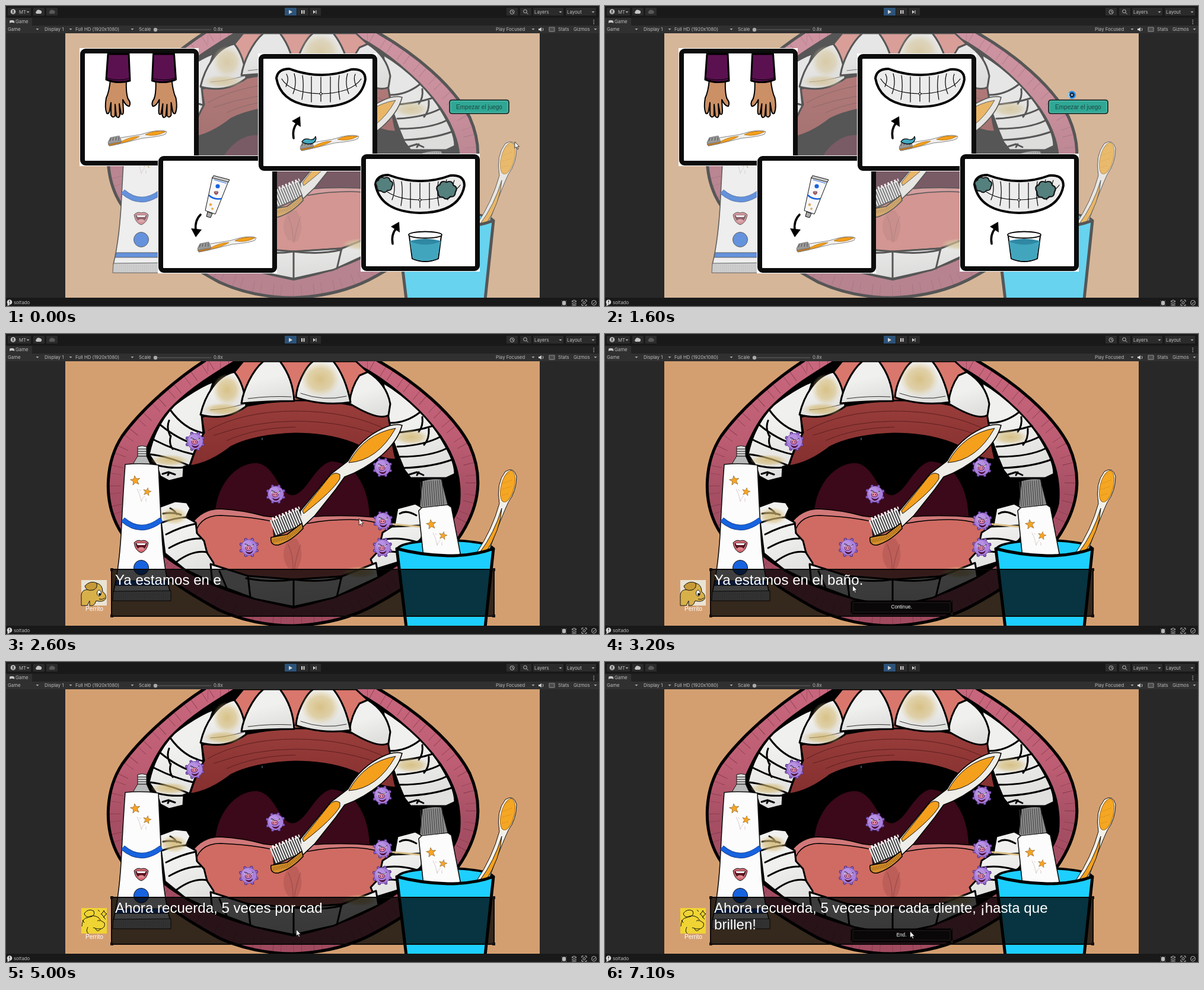
Write an HTML page that moves like this. It is 1000 px wide and 506 px high and loops after 7200 ms.

```html
<!DOCTYPE html>
<html lang="es">
<head>
<meta charset="utf-8">
<style>
html, body { margin: 0; width: 100%; height: 100%; overflow: hidden; background: #191919; }
svg { display: block; width: 100vw; height: 100vh; }
text { font-family: "Liberation Sans", Arial, sans-serif; white-space: pre; }
.ui text { font: 7.8px Inter, sans-serif; fill: #bdbdbd; }
.ink { stroke: #000; stroke-width: 3; stroke-linejoin: round; stroke-linecap: round; }
.thin { stroke: #111; stroke-width: 1; stroke-linejoin: round; }
.line { fill: none; }
.tooth { fill: url(#enamel); }
</style>
</head>
<body>
<svg viewBox="0 0 1000 506" preserveAspectRatio="none">
<defs>
  <linearGradient id="enamel" x2="0.3" y2="1"><stop offset="0.5" stop-color="#f0f0ef"/><stop offset="1" stop-color="#e0e0df"/></linearGradient>
  <radialGradient id="stain"><stop stop-color="#cfb162" stop-opacity=".75"/><stop offset=".6" stop-color="#d6bd7c" stop-opacity=".6"/><stop offset="1" stop-color="#dcc890" stop-opacity="0"/></radialGradient>
  <linearGradient id="lipShade" x2="0" y2="1"><stop stop-color="#c8677d"/><stop offset=".3" stop-color="#bd5d73"/><stop offset=".5" stop-color="#a64f64"/><stop offset="1" stop-color="#a04a5f"/></linearGradient>
  <linearGradient id="palate" x2="0" y2="1"><stop stop-color="#9a3e3b"/><stop offset="1" stop-color="#842f2f"/></linearGradient>
  <clipPath id="stage"><path d="M100 46H900V492H100Z"/></clipPath>
  <path id="lip" d="M340 42C295 70 232 122 196 172C168 215 165 275 186 320C212 375 290 428 360 466C400 484 440 492 485 492C540 490 585 478 625 455C680 425 745 382 775 325C800 280 803 235 782 188C755 135 690 80 622 42Z"/>
  <clipPath id="lipClip"><use href="#lip"/></clipPath>
  <path id="star" d="M0 -9L2.4 -3 9 -2.8 3.8 1.3 5.6 8 0 4.2 -5.6 8 -3.8 1.3 -9 -2.8 -2.4 -3Z" fill="#f7a423" stroke="#8d6a35" stroke-width=".8"/>
  <g id="sparks"><use href="#star" transform="translate(218 247) rotate(-8) scale(.9)"/><use href="#star" transform="translate(238 266) rotate(12) scale(.75)"/>
    <path d="M221 261Q226 270 228 282M234 273Q229 277 228 283M225 262l2 3M236 277v6" fill="none" stroke="#d6bcbc" stroke-width=".8"/></g>
  <g id="lips" class="thin"><path d="M216 352Q222 346 228 349Q234 346 240 352Q238 366 228 369Q218 366 216 352Z" fill="#d46a74"/><path d="M219 353H237Q235 363 228 364Q221 363 219 353Z" fill="#5c1320"/><path d="M220 353H236L234 356H222Z" fill="#fff" stroke="none"/><ellipse cx="228" cy="362" rx="5" ry="2.5" fill="#e08a90" stroke="none"/></g>
  <g id="germ">
    <g fill="#9a6bd0" stroke="#4c2a78" stroke-width="1" id="knobs"></g>
    <circle r="13.5" fill="#aa80dc" stroke="#6a48a0" stroke-width=".8"/>
    <circle cx="-3" cy="-4" r="8" fill="#c09ce8" opacity=".6"/>
    <ellipse cx="-1" cy="1" rx="5" ry="3.8" fill="#e58aa8" stroke="#5a1f4c"/>
    <path d="M-3 0v2M1 0v2M-7 -6l5 2M8 -5l-5 2" stroke="#381745" stroke-width="1.3"/>
    <circle cx="-5" cy="-3" r="1.7" fill="#fff"/><circle cx="5" cy="-3" r="1.7" fill="#fff"/><circle cx="-5" cy="-3" r=".8"/><circle cx="5" cy="-3" r=".8"/>
    <path d="M-6 6Q0 11 7 5Q4 12 -1 11Q-5 10 -6 6Z" fill="#4a1038"/>
  </g>
  <g id="card"><path d="M-1 -1H200V198H-1Z" fill="#fff"/><rect x="4" y="4" width="192" height="189" rx="5" fill="#fff" stroke="#0c0c0c" stroke-width="8"/></g>
  <g id="miniBrush" stroke="#777" stroke-width=".9">
    <path d="M271 212Q264 208 244 212L226 217 194 222 172 232 174 236 194 232 230 223Q262 220 269 216Z" fill="#f1f0ee"/>
    <path d="M269 212Q250 209 235 217Q252 221 269 212ZM194 229Q210 220 225 220Q214 227 194 231Z" fill="#f5a01c" stroke="#b87414"/>
    <path d="M172 230L176 222 191 219 195 229 174 234Z" fill="#9a9a9a"/>
    <path d="M175 228l2 -5M180 227l1 -5M185 227l1 -6M190 227v-6" stroke="#444"/>
    <path d="M172 233L194 229 193 232 175 236Z" fill="#c67a1d"/>
  </g>
  <g id="smile" class="ink">
    <path d="M456 122Q458 106 478 106Q531 126 582 107Q606 105 606 124Q598 169 531 170Q464 168 456 122Z" fill="#ececec" stroke-width="4"/>
    <path d="M465 123Q480 147 531 148Q582 147 599 123M531 120V161M515 119V162M547 119V162M500 117Q503 138 499 158M562 117Q559 138 563 158M486 114Q491 130 484 148M576 114Q571 130 578 148M473 115Q478 123 472 136M589 115Q585 123 591 136" class="line" style="stroke-width:1.2"/>
    <circle cx="531" cy="148" r="2" style="stroke-width:1" fill="#fff"/>
  </g>
  <g id="arrow"><path d="M485 223Q482 207 492 196" class="ink line" style="stroke-width:3.6"/><path d="M496 186L497 204 482 194Z"/></g>
  <g id="hand" class="ink">
    <path d="M176 124Q174 145 169 155Q166 172 170 181Q174 183 175 175L177 163 177 184Q180 190 184 185L184 166 186 186Q190 191 192 184L191 165 194 182Q198 185 198 177L197 158Q203 170 208 169Q211 163 206 157Q202 148 203 124Z" fill="#cb9065" style="stroke-width:2"/>
    <path d="M172 81H207L209 126Q188 132 169 124Z" fill="#5b1150"/><path d="M169 121Q188 128 209 122" class="line" style="stroke-width:1"/>
  </g>
  <path id="blob" d="M-14 2Q-19 -6 -11 -9Q-8 -17 0 -13Q9 -17 11 -8Q19 -5 14 3Q14 11 6 10Q0 17 -6 11Q-14 12 -14 2Z" fill="#54807e" stroke="#111" stroke-width="2"/>
</defs>

<path d="M0 0H1000V506H0Z" fill="#191919"/>
<path d="M0 20H1000V492H0Z" fill="#282828"/>
<path d="M0 20H1000V33H0Z" fill="#222"/><path d="M0 20H44V33H0Z" fill="#303030"/><path d="M0 33H1000V46H0Z" fill="#303030"/>

<g clip-path="url(#stage)">
<path d="M100 46H900V492H100Z" fill="#d49f70"/>

<use href="#lip" fill="url(#lipShade)"/>
<g clip-path="url(#lipClip)"><use href="#lip" fill="none" stroke="#6f2a3d" stroke-opacity=".7" stroke-width="42" stroke-dasharray=".8 13 .6 21"/></g>
<use href="#lip" fill="none" stroke="#000" stroke-width="5"/>
<path class="ink" style="stroke-width:4" d="M390 44C350 68 312 92 284 120C258 145 246 175 236 197C215 215 200 245 208 285C225 340 255 370 300 396C350 430 420 448 485 461C550 448 612 424 655 392C710 360 755 330 764 285C768 240 755 205 732 172C705 135 660 92 612 63L578 44Z"/>
<path class="ink" fill="url(#palate)" d="M330 140Q400 118 486 110Q570 110 648 138Q650 185 658 212Q630 212 608 195Q560 168 488 168Q420 170 380 190Q345 218 310 223Q320 190 334 166Z"/>
<path d="M340 163Q400 130 488 130Q580 130 645 163M350 171Q420 147 488 147Q570 147 638 174M372 180Q420 158 488 157" class="line" stroke="#5c2020"/>
<path d="M353 305C353 255 390 215 425 218C455 224 460 270 483 272C507 270 520 222 548 215C590 215 615 265 613 318L480 325Z" fill="#3b0919"/>
<path class="ink" style="stroke-width:1.5" d="M312 322Q330 295 360 295Q400 297 435 307L478 312Q550 303 620 309L648 325 650 360 600 400 360 400 330 350Z" fill="#d17879"/>
<path class="ink" style="stroke-width:1.5" d="M318 345Q322 306 362 306Q435 309 482 325Q530 313 580 313Q640 314 652 336Q645 380 612 395L565 408 485 414 405 408 340 392Z" fill="#cf6b63"/>
<path d="M478 345Q459 372 476 395L491 397Q506 372 490 345Z" fill="#9c4745" opacity=".35"/><path d="M476 355Q485 375 484 399M497 355Q489 375 486 399" class="line" stroke="#8d4343" stroke-width=".8"/>

<path d="M382 68L400 46H590L614 68 580 112 486 112 402 118Z" fill="#d9776d" class="ink"/>
<g class="ink">
  <path class="tooth" d="M350 80C318 92 284 120 284 120C262 142 248 170 241 203L254 222 260 240 275 248 299 242 300 224 310 221 318 198 333 168 330 138Z"/>
  <path class="line" d="M277 128Q300 160 332 167M260 153Q290 178 322 187M275 146Q270 158 277 172M247 177Q280 195 316 203M244 203Q275 207 309 222M278 172Q274 184 281 194M257 222Q280 227 300 225M264 236L274 233 285 237M275 234L273 238"/>
  <path class="tooth" d="M636 82C680 108 718 148 735 178C748 200 757 218 757 236L742 243H682L672 230 662 206 651 175 645 140Z"/>
  <path class="line" d="M648 150Q675 150 698 132M651 167Q688 165 720 155M660 190Q705 188 733 173M664 207Q715 207 743 193M671 226Q720 224 752 212M702 140Q704 155 696 165M713 160Q714 177 705 187M680 237L693 233 704 238M696 233L693 238"/>
  <path class="tooth" d="M328 136C335 105 355 70 385 64Q402 85 405 122Q370 148 328 136Z"/>
  <path class="tooth" d="M579 117Q582 90 596 70L610 64Q642 84 648 118L645 137Q628 147 579 117Z"/>
  <path class="tooth" d="M397 117C400 95 415 62 434 46H462Q484 75 486 113Q440 113 397 117Z"/>
  <path class="tooth" d="M489 107C490 85 505 55 518 46H552C568 66 576 90 581 115Q535 122 489 107Z"/>
  <path class="line" style="stroke-width:.8" d="M345 128Q370 127 402 118M497 100Q535 114 574 105M408 109Q445 104 481 106"/>
  <path class="tooth" d="M258 292L285 282 305 284 311 294 304 309 320 318 322 336 334 349 339 369 350 386 350 420 300 396 268 370Z"/>
  <path class="line" d="M263 318Q285 310 304 309M270 338Q295 325 320 320M275 361Q305 344 328 345M288 384Q315 364 339 368M265 303Q282 300 295 305M277 294Q285 298 288 304"/>
  <path class="tooth" d="M660 294L690 286 715 300 700 345 664 384 622 397 615 380 628 366 635 335 655 322Z"/>
  <path class="line" d="M650 325L698 323M635 347Q660 342 690 350M627 370Q650 364 670 370M664 303Q675 296 692 306"/>
  <path class="tooth" d="M345 388L408 408 485 414 566 409 624 386 628 410 552 445 485 460 420 447 348 420Z"/>
  <path class="line" d="M408 408L412 444M485 414V460M566 409L558 443M360 400L372 428M405 412Q450 420 485 414Q530 420 566 411"/>
</g>
<g fill="url(#stain)">
  <ellipse cx="373" cy="94" rx="25" ry="27"/><ellipse cx="366" cy="127" rx="34" ry="11"/><ellipse cx="530" cy="76" rx="34" ry="30"/>
  <ellipse cx="276" cy="213" rx="32" ry="10"/><ellipse cx="683" cy="174" rx="30" ry="13"/><ellipse cx="283" cy="307" rx="24" ry="15"/><ellipse cx="597" cy="402" rx="30" ry="10"/>
</g>
<path d="M645 320L698 325" stroke="#d8bf87" stroke-width="3"/>
<path d="M432 175v4" stroke="#6d8fb0" stroke-width="1"/>

<!-- large brush -->
<path class="ink" style="stroke-width:1.6" d="M668 154Q655 150 636 159Q598 176 577 214L548 236 496 299 500 326 521 306 556 262 571 241Q604 229 634 204Q661 180 668 154Z" fill="#efede8"/>
<path class="thin" fill="#f5a01c" d="M657 159Q605 168 578 217Q626 214 657 159ZM563 237Q554 231 545 241L500 298 502 303Q552 264 563 244Z"/>
<path class="thin" d="M449 316L494 295 499 322 452 344Z" fill="#222"/>
<path d="M450 327L498 307" stroke="#e6e6e6" stroke-width="27" stroke-dasharray="2.6 1.5"/>
<path d="M449 312L495 293" stroke="#fff" stroke-width="5" stroke-dasharray="3 3"/>
<path class="ink" style="stroke-width:1.6" d="M447 343L474 338 499 319 501 328Q482 349 459 356Q445 357 447 343Z" fill="#d38e2b"/>
<path d="M450 349L476 343 499 325" class="line" stroke="#8a5512" stroke-width="6" stroke-dasharray=".8 2"/>

<!-- paste tube -->
<g class="thin">
  <path d="M222 190Q229 187 237 190V206H222Z" fill="#ddd"/><path class="line" d="M222 194H237M222 198H237M222 202H237"/>
  <path d="M222 206H237L244 221H213Z" fill="#b9b9b9"/>
  <path d="M201 220Q229 217 257 221Q260 290 263 342Q266 395 277 436H181Q192 390 195 320Q198 260 201 220Z" fill="#fcfcfc" style="stroke-width:1.6"/>
  <path d="M197 313Q228 340 262 313" class="line" style="stroke:#123a87;stroke-width:9"/><path d="M197 313Q228 340 262 313" class="line" style="stroke:#1763df;stroke-width:7.5"/>
  <circle cx="228" cy="394" r="12.5" fill="#1763df"/><path d="M186 416H271L273 424H184Z" fill="#1763df"/>
  <path d="M181 434L278 433V450H180Z" fill="#c9c9c9"/><path d="M182 442H277" stroke="#888" style="stroke-width:13" stroke-dasharray=".7 2.5" stroke-opacity=".45"/>
</g>
<use href="#sparks"/><use href="#lips"/>

<!-- cup -->
<ellipse cx="741" cy="362" rx="80" ry="14" fill="#1ccfff" class="ink" style="stroke-width:4"/>
<g class="thin">
  <path d="M702 292L745 288 751 292 767 375 704 376 696 298Z" fill="#fcfcfc" style="stroke-width:1.6"/>
  <path d="M702 248Q718 243 734 245L745 288 701 293 698 290Z" fill="#8b8b8b"/><path d="M700 270L739 267" style="stroke:#3f3f3f;stroke-width:42" stroke-dasharray="1 2.6"/>
  <path d="M793 370Q820 330 832 286Q826 252 842 232Q856 223 861 240Q861 265 847 284Q837 305 812 372Z" fill="#f1efe9"/>
  <ellipse cx="846" cy="257" rx="11" ry="27" transform="rotate(14 846 257)" fill="#f5a623" style="stroke:#a86b11"/>
  <path d="M842 238L850 235M838 252L854 246M836 262L853 257M837 272L848 269" style="stroke:#b97514" stroke-dasharray="1 2"/>
  <path d="M798 370Q824 335 836 294Q834 330 808 371Z" fill="#f5a01c"/>
</g>
<use href="#sparks" transform="translate(499 74)"/>
<path d="M659 362Q700 373 745 374Q790 374 822 362L808 495H675Z" fill="#1ccfff" class="ink" style="stroke-width:5"/>

<g id="game">
  <g id="germs"></g>
  <path d="M178 397H823V476H178Z" fill="#000" fill-opacity=".75" stroke="#0a0808" stroke-width="2"/>
  <path d="M176 395h5v5h-5zM820 395h5v5h-5zM176 473h5v5h-5zM820 473h5v5h-5z" fill="#15100e"/>
  <g id="calm"><path d="M127 415H170V458H127Z" fill="#e9e3d4"/>
    <path class="thin" fill="#d8b04a" d="M127 440Q128 431 138 431Q141 420 152 420Q163 422 163 435Q170 439 168 447Q163 453 152 450Q150 457 146 458H141V450L137 458H127Z"/>
    <path class="thin" fill="#c79a38" d="M133 425Q142 415 153 420Q155 430 146 432Q135 434 133 425Z"/>
    <ellipse class="thin" cx="157" cy="437" rx="3.4" ry="5" fill="#fff"/><circle cx="158" cy="439" r="2"/><path d="M157 447Q163 449 167 445" class="thin line"/></g>
  <g id="happy"><path d="M127 415H170V458H127Z" fill="#f0d433"/>
    <path class="thin line" d="M128 446Q128 432 138 431Q146 425 156 431Q159 437 166 440Q168 447 161 450Q153 451 147 448M132 424Q139 415 148 420Q151 428 142 430Q133 431 132 424ZM154 437Q156 434 159 437M151 450Q154 457 160 450M138 447Q134 455 139 458M163 423l2 -4 2 4 3 2 -3 2 -2 4 -2 -4 -3 -2ZM155 418l3 3M165 431l3 3M129 435l3 5"/></g>
  <text x="149" y="467" font-size="10.2" text-anchor="middle" fill="#fff">Perrito</text>
  <g font-size="24.1" fill="#fff"><text id="row0" x="184" y="423"/><text id="row1" x="184" y="451"/></g>
  <g id="next"><path d="M415.5 450.5H585V472H415.5Z" fill="#090707" stroke="#000" stroke-width="2"/><path d="M418 453H582V469H418Z" fill="none" stroke="#2b2422" stroke-width=".7"/>
    <path d="M413 448h4v4h-4zM583 448h4v4h-4zM413 470h4v4h-4zM583 470h4v4h-4z" fill="#1a1412"/>
    <text id="label" x="500" y="463" font-size="8.2" text-anchor="middle" fill="#fff"/></g>
</g>

<g id="intro">
  <path d="M100 46H900V492H100Z" fill="#d8d8d8" opacity=".4"/>
  <use href="#card" x="125" y="72"/><use href="#card" x="257" y="253"/><use href="#card" x="426" y="81"/><use href="#card" x="599" y="250"/>
  <use href="#hand"/><use href="#hand" transform="translate(455.5) scale(-1 1)"/><use href="#miniBrush"/>
  <use href="#smile"/><use href="#arrow"/><use href="#miniBrush" x="324" y="8"/>
  <path class="ink" style="stroke-width:1.3" fill="#43a9c1" d="M499 229Q503 222 512 225Q519 227 522 220Q525 228 516 232Q506 234 499 229Z"/>
  <g class="thin"><path d="M348 289L375 296 353 351 336 345Z" fill="#f8f8f8"/><path d="M350 286L377 293 375 297 348 290Z" fill="#ccc"/>
    <path d="M340 347L348 350 345 357 338 355Z" fill="#aaa"/><circle cx="357" cy="304" r="3.6" fill="#1763df" style="stroke:none"/><path d="M342 319Q350 327 363 325" class="line" style="stroke:#1763df;stroke-width:2.5"/><path d="M351 293L372 299" style="stroke:#1763df"/></g>
  <use href="#lips" transform="translate(286 208) scale(.3)"/><use href="#star" transform="translate(345 335) scale(.3)"/><use href="#star" transform="translate(348 342) scale(.25)"/>
  <path d="M328 352Q318 362 320 378" class="ink line" style="stroke-width:3.6"/><path d="M312 375L330 377 320 390Z"/>
  <use href="#miniBrush" x="151" y="179"/>
  <use href="#smile" x="167" y="179"/><use href="#arrow" x="167" y="178"/>
  <use href="#blob" transform="translate(638 302) scale(.9)"/><use href="#blob" transform="translate(743 311) scale(1.05)"/>
  <path d="M680 388L685 426Q707 436 729 426L734 388Z" fill="#fff" class="ink" style="stroke-width:2"/><path d="M681 396Q707 389 733 396L728 426Q707 434 686 426Z" fill="#42a5be"/>
  <path d="M681 397Q707 408 733 397Q707 389 681 397Z" fill="#2f88a4"/><ellipse cx="707" cy="386" rx="28" ry="5.5" fill="#fff" class="ink" style="stroke-width:1.8"/>
  <rect x="748" y="158.5" width="100" height="23" rx="4" fill="#2fa794" stroke="#14211f" stroke-width="1.6"/>
  <rect x="750" y="160.5" width="96" height="19" rx="3" fill="none" stroke="#56c0ae"/>
  <text x="798" y="174" font-size="10" text-anchor="middle" fill="#1f4640">Empezar el juego</text>
</g>
</g>

<g class="ui">
  <path d="M3 3H42V16H3ZM46 3H65V16H46ZM68 3H87V16H68ZM491 3H510V16H491ZM512 3H531V16H512ZM844 3H863V16H844ZM867 3H886V16H867ZM889 3H940V16H889ZM944 3H995V16H944Z" fill="#2b2b2b"/>
  <path d="M470 3H490V16H470Z" fill="#2c5379"/>
  <path d="M477 6.5L483 10 477 13.5ZM498 7h2v6h-2zM501.5 7h2v6h-2zM518 7l4 3 -4 3zM522.5 7h1v6h-1z" fill="#d5d5d5"/>
  <circle cx="12" cy="9.5" r="4.3" fill="#c4c4c4"/><circle cx="12" cy="8.5" r="1.5" fill="#333"/><path d="M9.5 12Q12 9.5 14.5 12" fill="#333"/>
  <path id="cloud" d="M52 13Q49 12 51 9Q53 5 57 7Q61 8 60 11Q60 13 58 13Z" fill="#c4c4c4"/><use href="#cloud" x="22.5" opacity=".3"/>
  <g fill="none" stroke="#bbb"><circle cx="853.5" cy="10" r="3.5"/><path d="M853.5 8v2l2 1"/><circle cx="875.5" cy="9" r="2.8"/><path d="M877.5 11l3 3"/></g>
  <path id="carets" fill="#aaa"/>
  <path d="M6 26Q6 24 8 24H12Q15 25 14 29L12 28H8L6 29Z" fill="#c4c4c4"/>
  <path d="M990.5 23h1.500v1.500h-1.500zM990.5 26h1.500v1.500h-1.500zM990.5 29h1.500v1.500h-1.500z" fill="#aaa"/>
  <path d="M252 40H346" stroke="#666"/><circle cx="252" cy="40" r="3.2" fill="#aaa"/>
  <path d="M898 38h2l3 -2v7l-3 -2h-2z" fill="#d0d0d0"/><path d="M905 37q2 2 0 5" fill="none" stroke="#ccc"/>
  <path d="M916 36H925V43H916Z" fill="none" stroke="#999"/><path d="M917 38H924M917 40H924M918 42H923" stroke="#999" stroke-dasharray="1 1"/>
  <circle cx="6" cy="499.5" r="4.3" fill="#ddd"/><path d="M2.500 502v4l4 -2z" fill="#ddd"/><path d="M6 496.5v3.500M6 501.5v1" stroke="#222" stroke-width="1.3"/>
  <g fill="none" stroke="#bbb"><ellipse cx="941" cy="501" rx="2.5" ry="3.5" fill="#bbb"/><path d="M937 497l8 8M945 497l-8 8M937 501h8"/><path d="M954 498l4 -2 4 2 -4 2ZM954 501l4 2 4 -2M954 504l4 1 4 -1"/><path d="M971 499v-3h3M976 496h3v3M979 503v2h-3M974 505h-3v-3"/><circle cx="975" cy="500.5" r="2"/><circle cx="991.5" cy="500.5" r="4"/><path d="M989.5 500.5l1.500 1.500 3 -3"/></g>
  <text x="22" y="12.6">MT</text><text x="891" y="12.6">Layers</text><text x="946" y="12.6">Layout</text>
  <text x="16" y="29.3">Game</text><text x="3" y="42.3">Game</text><text x="65" y="42.3">Display 1</text><text x="117" y="42.3">Full HD (1920x1080)</text>
  <text x="224" y="42.3">Scale</text><text x="350" y="42.3">0.8x</text><text x="826" y="42.3">Play Focused</text><text x="931" y="42.3">Stats</text><text x="957" y="42.3">Gizmos</text>
  <text x="13" y="503">soltado</text>
</g>
<path id="pointer" d="M0 0V11L2.600 8.700 4.300 12.700 6 12 4.300 8.200H7.600Z" fill="#fff" stroke="#111" stroke-width=".8"/>
<g id="busy"><circle r="5.5" fill="#102b49" stroke="#2b8fe6" stroke-width="2.4"/><path d="M0 -5.500A5.500 5.500 0 0 1 5.500 0" fill="none" stroke="#8fd0ff" stroke-width="2.4"/><circle r="1.7" fill="#a9bccb"/></g>
</svg>
<script>
const $ = id => document.getElementById(id);
const show = (id, on) => $(id).setAttribute('display', on ? 'inline' : 'none');
const place = (el, x, y, turn = 0) => el.setAttribute('transform', `translate(${x} ${y}) rotate(${turn})`);

const LOOP = 7200, PRESS = 500, START = 1700, SPEED = 25 / 1100;
const lines = [
  { at: 1900, rows: ['Ya estamos en el baño.', ''], button: 'Continue.' },
  { at: 3620, rows: ['Ahora recuerda, 5 veces por cada diente, ¡hasta que ', 'brillen!'], button: 'End.' }
];
// pointer stops: time, x, y
const path = [[0, 858, 229], [400, 798, 174], [PRESS, 798, 174], [1000, 692, 95], [1900, 820.5, 169],
  [3200, 417.5, 424], [3550, 489.5, 451], [5000, 489.5, 451], [6100, 549.5, 453], [7100, 514.5, 454], [LOOP, 514.5, 454]];
const spots = [[319, 181], [455, 270], [635, 225], [636, 315], [635, 360], [410, 360]];

$('knobs').innerHTML = Array.from({ length: 8 }, (_, i) => {
  const a = i * Math.PI / 4 + .4;
  return `<circle cx="${14.3 * Math.cos(a)}" cy="${14.3 * Math.sin(a)}" r="2.2"/>`;
}).join('');
$('germs').innerHTML = '<use href="#germ"/>'.repeat(spots.length);
const germs = [...$('germs').children];
$('carets').setAttribute('d', [[37, 9], [935, 9], [990, 9], [53, 38], [109, 38], [213, 38], [889, 38], [994, 38]]
  .map(([x, y]) => `M${x - 2.5} ${y}h5l-2.5 2.8z`).join(''));

function pointerAt(t) {
  const i = Math.max(1, path.findIndex(p => p[0] >= t));
  const [t0, x0, y0] = path[i - 1], [t1, x1, y1] = path[i];
  const k = (t - t0) / (t1 - t0), e = k * k * (3 - 2 * k);
  return [x0 + (x1 - x0) * e, y0 + (y1 - y0) * e];
}

function draw(t) {
  const waiting = t >= PRESS && t < START;
  show('intro', t < START);
  show('game', t >= START);
  show('busy', waiting);
  show('pointer', !waiting);
  const [x, y] = pointerAt(t);
  place($('pointer'), x, y);
  place($('busy'), x, y, t * .36);
  const sway = Math.sin(t / 210);
  germs.forEach((g, i) => place(g, spots[i][0] + .7 * sway, spots[i][1], 4 * sway));

  const second = t >= lines[1].at, line = lines[+second];
  const [a, b] = line.rows;
  const count = Math.max(0, Math.floor((t - line.at) * SPEED + 1e-6));
  $('row0').textContent = a.slice(0, count);
  $('row1').textContent = b.slice(0, Math.max(0, count - a.length));
  $('label').textContent = line.button;
  show('next', count > a.length + b.length);
  show('calm', !second);
  show('happy', second);
}

const origin = performance.now();
(function tick() {
  draw((performance.now() - origin) % LOOP);
  requestAnimationFrame(tick);
})();
</script>
</body>
</html>
```
